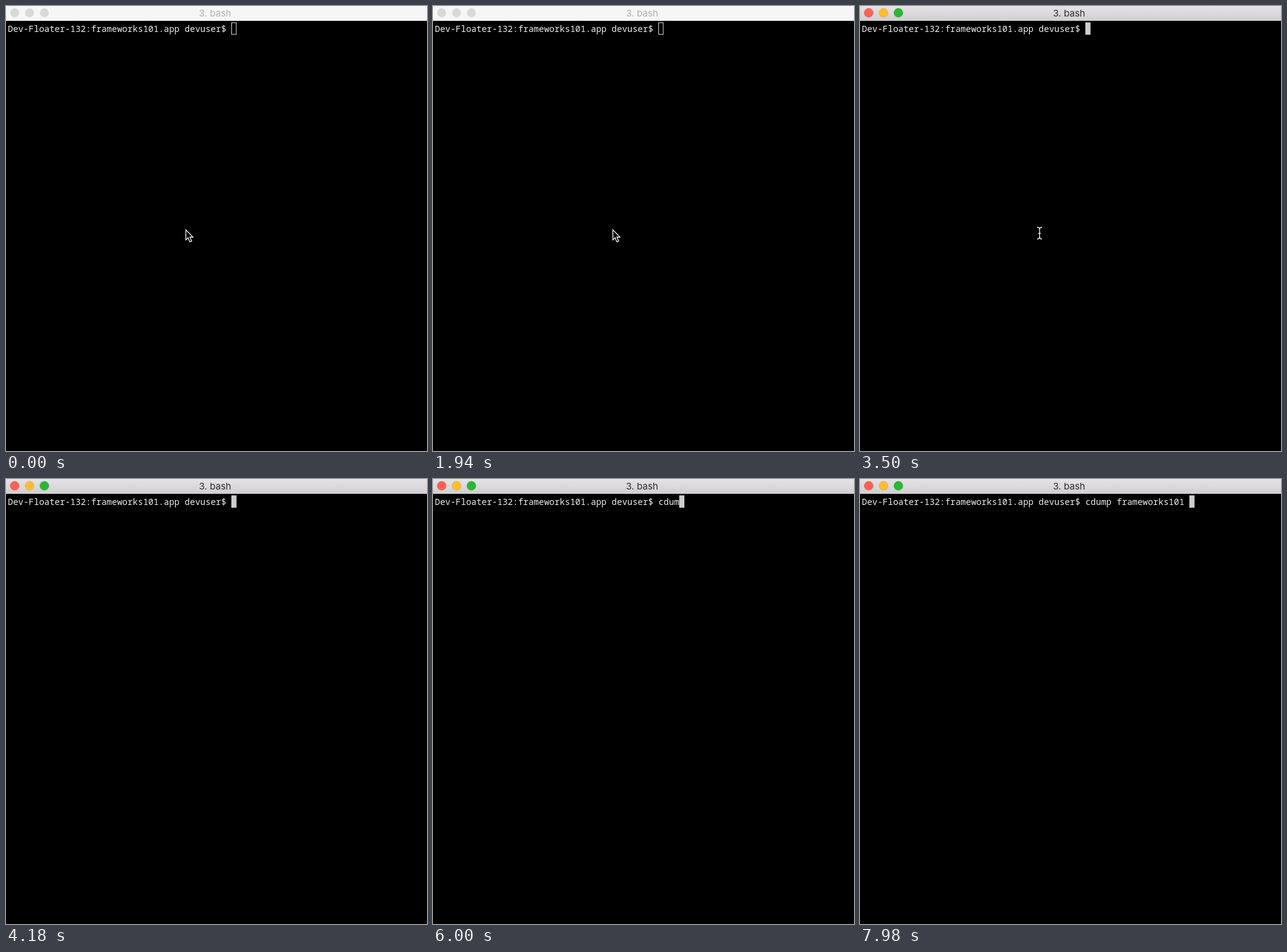
Recreate the animation shown at these times as an HTML page. Size 680 px wide and 720 px high, loop 8000 ms.

```html
<!DOCTYPE html>
<html lang="en">
<head>
<meta charset="utf-8">
<title>Terminal</title>
<style>
  html, body { margin: 0; width: 100%; height: 100%; overflow: hidden; background: #000; }
  svg { display: block; width: 680px; height: 720px; }
  .title { font: 15px Inter, Roboto, sans-serif; text-anchor: middle; fill: #2e2d2e; }
  .line { font: 500 14px "Noto Sans Mono", "DejaVu Sans Mono", monospace; fill: #ececec; white-space: pre; }
  .bar { fill: url(#active); }
  .inactive .bar { fill: #f6f6f6; }
  .inactive .lights circle { fill: #d9d9d9; stroke: none; }
  .inactive .title { fill: #b0b0b0; }
  .caret { fill: #cfcdd0; stroke: #cfcdd0; }
  .inactive .caret { fill: none; stroke: #dedede; }
  .pointer { fill: #000; stroke: #f6f6f6; stroke-width: 1.3; }
  .ibeam { fill: none; stroke: #ececec; stroke-width: 1.4; }
</style>
</head>
<body>
<svg id="window" viewBox="0 0 680 720">
  <defs>
    <linearGradient id="active" x2="0" y2="1">
      <stop stop-color="#e5e3e6"/>
      <stop offset="1" stop-color="#d0ced1"/>
    </linearGradient>
  </defs>
  <rect width="680" height="720"/>
  <rect class="bar" width="680" height="24"/>
  <g class="lights">
    <circle cx="14" cy="11" r="7.2" fill="#fc6251" stroke="#df5145" stroke-width=".6"/>
    <circle cx="38" cy="11" r="7.2" fill="#fdbd2e" stroke="#dea034" stroke-width=".6"/>
    <circle cx="62" cy="11" r="7.2" fill="#2ab834" stroke="#25a02b" stroke-width=".6"/>
  </g>
  <text class="title" x="337.7" y="17">3. bash</text>
  <text class="line" id="line" x="3" y="42" xml:space="preserve"></text>
  <rect class="caret" id="caret" y="27" width="7.4" height="19"/>
  <path class="pointer" id="pointer" d="M290.5 362V378.5L294 375L297 381.7L300 380.4L297 374H302Z"/>
  <path class="ibeam" id="ibeam" d="M286 358Q290 358 290 361.5Q290 358 294 358M290 361V374M286 377Q290 377 290 373.5Q290 377 294 377M288 368H292"/>
</svg>
<script>
const LOOP = 8000;
const FOCUS_AT = 2160;
const IBEAM_HIDE_AT = 4180; // the pointer hides as typing begins
const CHAR_WIDTH = 8.4;
const PROMPT = "Dev-Floater-132:frameworks101.app devuser$ ";
const KEYS = [
  [4240, "c"], [4700, "d"], [5120, "u"], [5560, "m"], [6080, "p"],
  [6400, " "], [6720, "f"], [7200, "rameworks101 "]
];
const byId = id => document.getElementById(id);
const show = (id, visible) => byId(id).setAttribute("visibility", visible ? "visible" : "hidden");

function render(time) {
  const focused = time >= FOCUS_AT;
  const typed = KEYS.filter(([at]) => time >= at).map(([, text]) => text).join("");
  const line = PROMPT + typed;
  byId("window").classList.toggle("inactive", !focused);
  byId("line").textContent = line;
  byId("caret").setAttribute("x", 3.3 + line.length * CHAR_WIDTH);
  show("pointer", !focused);
  show("ibeam", focused && time < IBEAM_HIDE_AT);
}

function tick() {
  render(performance.now() % LOOP);
  requestAnimationFrame(tick);
}
tick();
</script>
</body>
</html>
```
